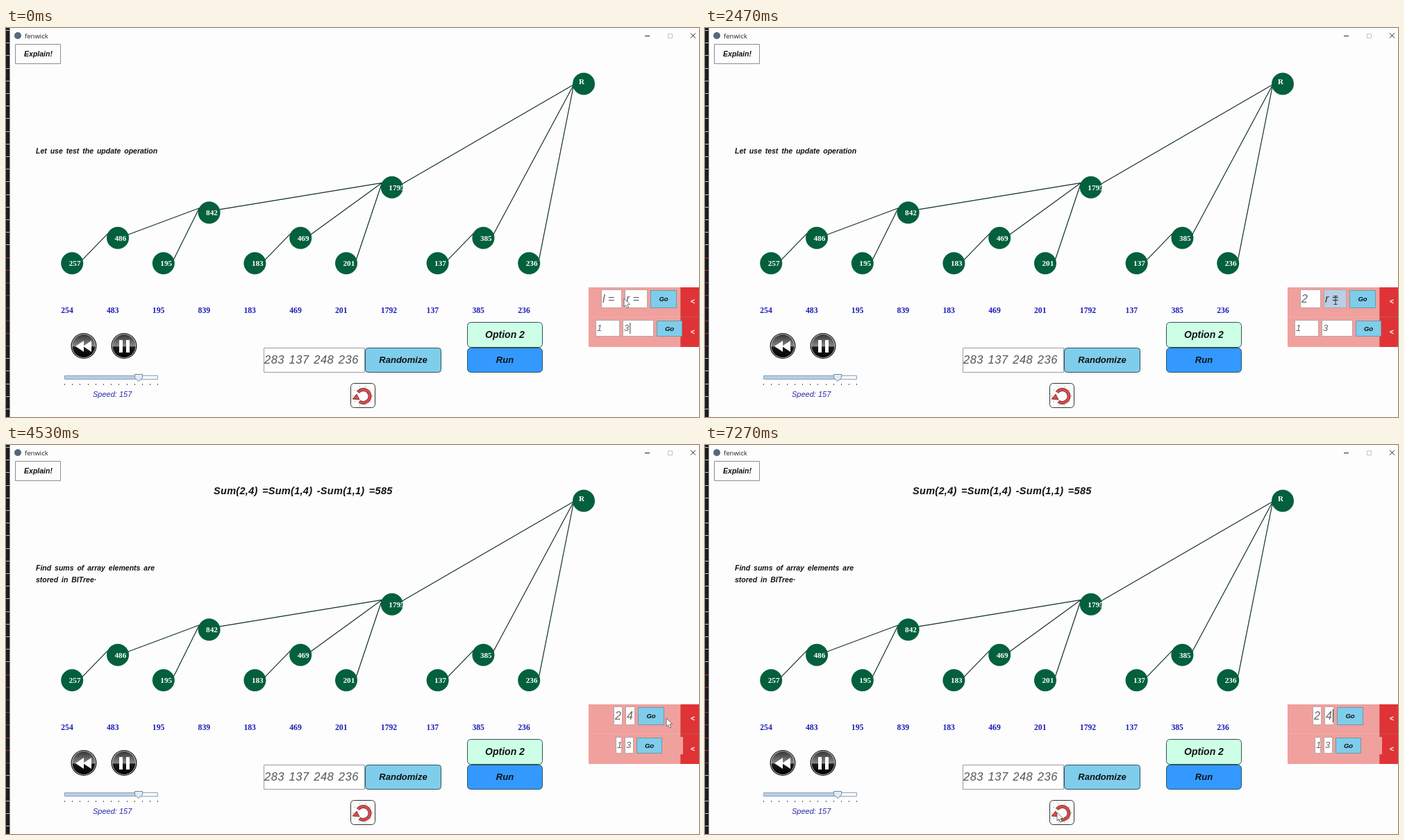
Write an HTML page with a canvas that moves like this. It is 998 px wide and 561 px high and loops after 7310 ms.

```html
<!DOCTYPE html>
<html lang="en">
<head>
<meta charset="utf-8">
<title>fenwick</title>
<style>
html, body { margin: 0; width: 100%; height: 100%; overflow: hidden; background: #fdfdfd; }
canvas { display: block; }
</style>
</head>
<body>
<canvas id="stage" width="998" height="561"></canvas>
<script>
const c = document.getElementById('stage').getContext('2d');
const LOOP = 7310;
const TYPE_L = 1250, PICK_R = 2200, TYPE_R = 3000, SHOW_SUM = 4270;
const SANS = '"Liberation Sans", Arial, sans-serif';
const SERIF = '"Liberation Serif", "Times New Roman", serif';
const BLUE = '#7ecdeb', GREEN = '#03603c', INK = '#111';
const NUMBER = { style: 'bold ', family: SERIF };

const values = [254, 229, 195, 161, 183, 286, 201, 283, 137, 248, 236];

// each move: start, end, destination
const MOVES = [
  { from: 300, to: 700, x: 885, y: 390 },
  { from: 1750, to: 2200, x: 908, y: 392 },
  { from: 3050, to: 3600, x: 951, y: 394 },
  { from: 5350, to: 5880, x: 539, y: 433 },
  { from: 6100, to: 6750, x: 507, y: 530 }
];

function text(s, x, y, size, color = INK, opt = {}) {
  c.font = (opt.style ?? 'italic bold ') + size + 'px ' + (opt.family ?? SANS);
  c.letterSpacing = (opt.gap ?? 0) + 'px';
  c.wordSpacing = (opt.space ?? 0) + 'px';
  c.textAlign = opt.align ?? 'left';
  c.fillStyle = color;
  c.fillText(s, x, y);
}

function box(x, y, w, h, fill, stroke, r = 0) {
  c.beginPath();
  c.roundRect(x + .5, y + .5, w, h, r);
  c.fillStyle = fill;
  c.fill();
  c.strokeStyle = stroke;
  c.lineWidth = 1;
  c.stroke();
}

function rect(x, y, w, h, fill) {
  c.fillStyle = fill;
  c.fillRect(x, y, w, h);
}

function shape(points, fill, stroke, width = 1) {
  c.beginPath();
  points.forEach(p => c.lineTo(p[0], p[1]));
  c.closePath();
  c.fillStyle = fill;
  c.fill();
  if (!stroke) return;
  c.strokeStyle = stroke;
  c.lineWidth = width;
  c.stroke();
}

function line(x1, y1, x2, y2, color, width = 1) {
  c.beginPath();
  c.moveTo(x1, y1);
  c.lineTo(x2, y2);
  c.strokeStyle = color;
  c.lineWidth = width;
  c.stroke();
}

function disc(x, y, r, fill) {
  c.beginPath();
  c.arc(x, y, r, 0, Math.PI * 2);
  c.fillStyle = fill;
  c.fill();
}

function button(label, x, y, w, h, fill, size, r = 4) {
  box(x, y, w, h, fill, '#33505c', r);
  text(label, x + w / 2 + .5, y + h / 2 + size * .35, size, INK, { align: 'center' });
}

function drawWindow() {
  rect(0, 0, 998, 561, '#fdfdfd');
  rect(0, 0, 5.5, 561, '#1b1d22');
  for (let y = 3; y < 561; y += 18.2) {
    rect(0, Math.round(y), 5, 1, y > 330 && y < 470 ? '#a03a44' : '#c8c8c8');
  }
  disc(17, 11, 5, '#59677c');
  text('fenwick', 27, 15, 9.5, '#222', { style: '', family: '"Open Sans", sans-serif' });
  line(920, 11.5, 927, 11.5, '#222');
  box(953, 8, 6, 6, '#fdfdfd', '#c4c4c4');
  line(986, 7.5, 993, 14.5, '#222');
  line(993, 7.5, 986, 14.5, '#222');
  box(13, 23, 65, 28, '#fdfdfd', '#8b8b98');
  text('Explain!', 46.5, 41, 10.5, INK, { align: 'center' });
}

const low = i => i & -i;
const sum = (from, to) => values.slice(from - 1, to).reduce((a, b) => a + b, 0);
const place = i => ({ x: 29.4 + 65.8 * i, y: 339.3 - 36.5 * Math.log2(low(i)) });

function drawTree() {
  const root = { x: 832, y: 80.5 };
  const ids = values.map((_, k) => k + 1);
  for (const i of ids) {
    const up = i + low(i), a = place(i);
    const b = up > values.length ? { x: root.x, y: root.y + 7.5 } : place(up);
    line(a.x + 14.2, a.y - 4.5, b.x - 14.3, b.y - 6.5, '#12302c', 1.2);
  }
  for (const i of ids) {
    const p = place(i), label = sum(i - low(i) + 1, i);
    const bump = low(i) === i && i > 0 ? 3 : 0; // first value was raised by 3
    disc(p.x, p.y, 16, GREEN);
    text(label + bump, p.x - 4.5, p.y + 4, 11.2, '#fff', NUMBER);
    text(label, p.x - 16, 411, 11.7, '#1c1cb4', NUMBER);
  }
  disc(root.x, root.y, 16, GREEN);
  text('R', root.x - 7, root.y, 11, '#fff', NUMBER);
}

function roundButton(x, y) {
  const g = c.createLinearGradient(0, y - 17, 0, y + 17);
  g.addColorStop(0, '#333');
  g.addColorStop(.5, '#858585');
  g.addColorStop(.55, '#1a1a1a');
  g.addColorStop(1, '#000');
  disc(x, y, 18.5, '#151515');
  disc(x, y, 17.3, '#d8d8d8');
  disc(x, y, 16.5, g);
}

function drawControls() {
  roundButton(112, 458.5);
  for (const x of [100, 111]) shape([[x, 459], [x + 12, 451], [x + 12, 467]], '#fff');
  roundButton(170, 458.5);
  for (const x of [163, 173]) rect(x, 450, 5, 18, '#fff');

  box(84, 501, 134, 5, '#fff', '#8aa0b8');
  rect(85, 502, 104, 4, '#b8cfe5');
  shape([[185.5, 499.5], [196.5, 499.5], [196.5, 504.5], [191, 509.5], [185.5, 504.5]], '#e2ebf3', '#74879b');
  for (let i = 0; i < 13; i++) rect(Math.round(84 + i * 11.2), 513, 1, 2, '#555');
  text('Speed: 157', 125, 532, 11, '#2828a8', { style: 'italic ' });

  box(371, 461, 145, 35, '#fff', '#9a9aa4');
  text(values.slice(-4).join(' '), 372, 484, 16.5, '#555', { style: 'italic ', gap: .5, space: 1.5 });
  button('Randomize', 517, 461, 109, 35, BLUE, 13);
  button('Option 2', 664, 424, 108, 36, '#ccffe5', 14, 5);
  button('Run', 664, 461, 108, 35, '#3399ff', 13, 5);
}

function drawReset() {
  box(496, 512, 35, 35, '#fdfdfd', '#333', 5);
  for (let i = 0; i < 10; i++) {
    const a = i * Math.PI / 5;
    rect(513 + 14 * Math.cos(a), 530 + 14 * Math.sin(a), 1, 1, '#777');
  }
  for (const [w, color] of [[4.8, '#5a2a2a'], [3.4, '#dc4a48']]) {
    c.beginPath();
    c.arc(514.5, 531, 9.5, -2.5, 2.2);
    c.strokeStyle = color;
    c.lineWidth = w;
    c.stroke();
  }
  shape([[499, 535], [505, 528], [509, 536]], '#dc4a48', '#5a2a2a', .8);
}

// A centred row: two fields and a button, 5 px apart.
function drawRow(y, h, size, fields, goWidth) {
  const total = fields.reduce((n, f) => n + f.w + 5, goWidth);
  let x = Math.round(911 - total / 2);
  for (const f of fields) {
    box(x, y, f.w, h, f.picked ? '#b8cfe5' : '#fff', '#b9a4a8');
    text(f.s, x + 2, y + h / 2 + size * .38, size, f.picked ? '#333' : '#666', { style: 'italic ' });
    if (f.caret) rect(x + size * .56 + 3, y + 4, 1, h - 7, '#444');
    x += f.w + 5;
  }
  box(x, y + 1, goWidth, h - 1, BLUE, '#6f98a8');
  text('Go', x + goWidth / 2 + .5, y + h / 2 + 4, 9.5, INK, { align: 'center' });
}

function drawPanel(t) {
  const done = t >= SHOW_SUM, blink = t % 1000 < 500;
  rect(839, 374, 132, 86, '#f0a19d');
  rect(971, 374, 27, 86, '#e03336');
  line(839, 416.5, 971, 416.5, '#f3aaa6');
  line(971, 416.5, 998, 416.5, '#b85a5e');
  line(971.5, 374, 971.5, 460, '#cf6164');
  for (const y of [398, 442]) text('<', 986, y, 10.5, '#fff', { style: 'bold ' });
  if (done) rect(970, 421, 5, 25, '#f0a19d');

  drawRow(377, 26, 16, [
    {
      s: t < TYPE_L ? 'l =' : '2', w: done ? 12 : 29,
      picked: t >= 750 && t < TYPE_L,
      caret: blink && t >= TYPE_L && t < PICK_R
    },
    {
      s: t < TYPE_R ? 'r =' : '4', w: done ? 13 : 32,
      picked: t >= PICK_R && t < TYPE_R,
      caret: blink && t >= TYPE_R
    }
  ], 37);
  drawRow(421, 23, 13, [
    { s: '1', w: done ? 8 : 34 },
    { s: '3', w: done ? 12 : 44, caret: blink && t < 750 }
  ], 36);
}

function drawMessages(t) {
  const say = (s, y) => text(s, 43, y, 10.5, INK, { space: 2 });
  if (t < SHOW_SUM) return say('Let use test the update operation', 181);
  say('Find sums of array elements are', 181);
  say('stored in BITree·', 198);
  text(`Sum(2,4) =Sum(1,4) -Sum(1,1) =${sum(2, 4)}`, 299, 71, 14.5, INK, { gap: .3, space: 2 });
}

function drawPointer(t) {
  let x = 890, y = 390;
  for (const m of MOVES) {
    const k = Math.min(1, Math.max(0, (t - m.from) / (m.to - m.from)));
    const e = k * k * (3 - 2 * k);
    x += (m.x - x) * e;
    y += (m.y - y) * e;
  }
  if (t > 600 && t < 3250) {
    line(x, y - 5, x, y + 6, '#333');
    for (const d of [-5.5, 6.5]) line(x - 2.5, y + d, x + 2.5, y + d, '#333');
    return;
  }
  const arrow = [[0, 0], [0, 12], [2.7, 9.5], [4.7, 14], [6.8, 13], [4.9, 8.8], [8.6, 8.6]];
  shape(arrow.map(p => [x + p[0], y + p[1]]), '#fff', '#555', .8);
}

function draw(t) {
  drawWindow();
  drawTree();
  drawControls();
  drawReset();
  drawPanel(t);
  drawMessages(t);
  drawPointer(t);
}

const start = performance.now();
function tick() {
  draw((performance.now() - start) % LOOP);
  requestAnimationFrame(tick);
}
tick();
</script>
</body>
</html>
```
